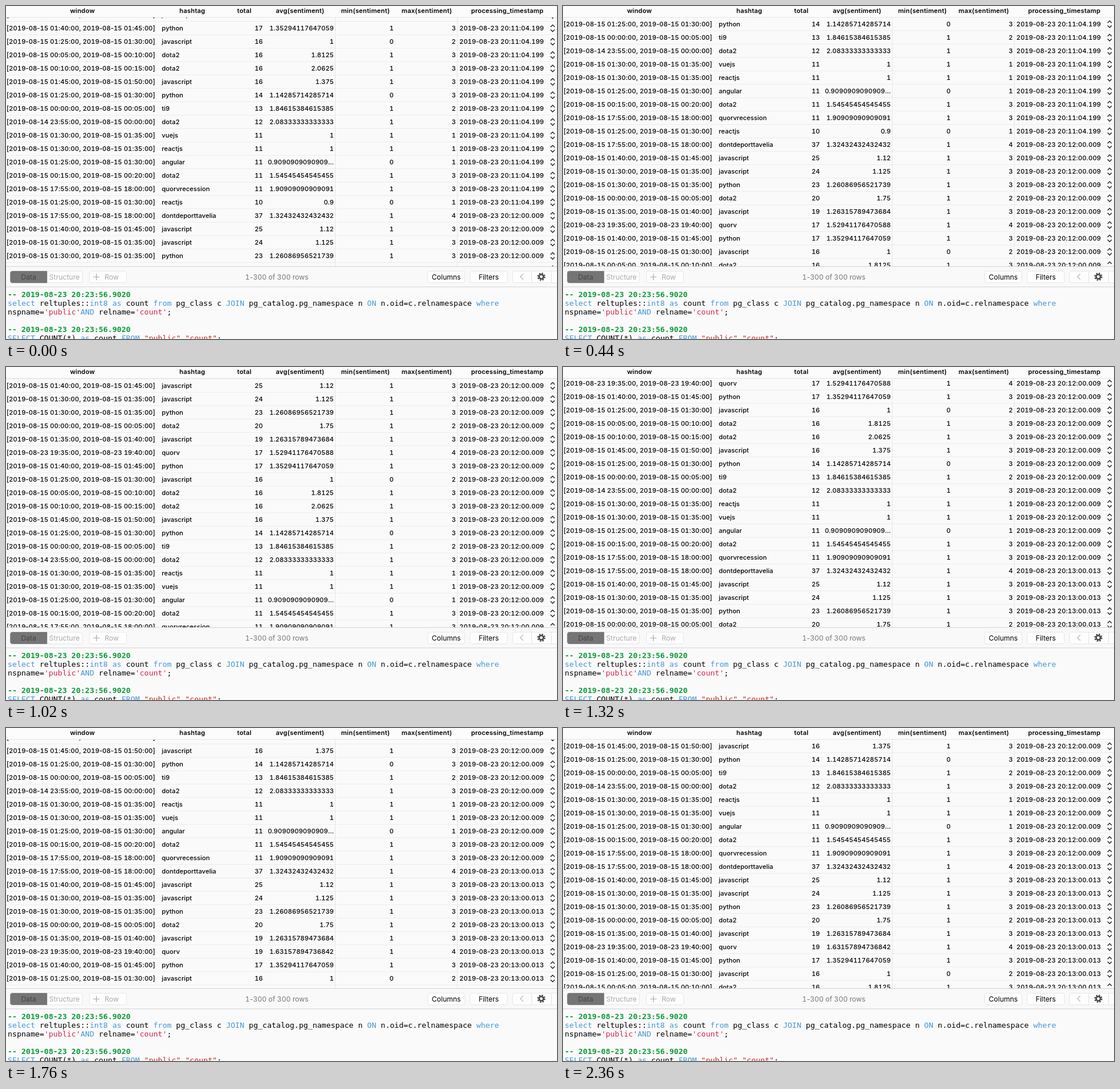
These frames come from a looping animation (948 px wide and 572 px high, 2.66 s). An HTML page:

```html
<!DOCTYPE html>
<html lang="en">
<head>
<meta charset="utf-8">
<title>Query results</title>
<style>
  html, body { margin: 0; width: 100%; height: 100%; overflow: hidden; }
  body { position: relative; background: #fafafa; color: #000; font: 11px Inter, sans-serif;
         font-variant-numeric: tabular-nums; }
  body * { box-sizing: border-box; }
  #header, #table, #bar, #sql, #header span, #bar span, .row, .row span, svg { position: absolute; white-space: pre; }
  s { text-decoration: none; font-variant-numeric: normal; }

  #header { left: 0; top: 0; width: 948px; height: 20px; background: #fcfcfc;
            border-bottom: 1px solid #e6e6e6; font-weight: 600; letter-spacing: .2px; }
  #header span { top: 0; line-height: 16px; transform: translateX(-50%); }

  #table { left: 0; top: 20px; width: 948px; height: 427px; overflow: hidden;
           font-weight: 500; letter-spacing: .05px; }
  #rows { position: absolute; top: -131px; left: 0; }
  .row { left: 0; width: 948px; height: 23px; line-height: 23px; border-bottom: 1px solid #ededed; }
  .row svg { left: 936px; top: 4px; }
  .rule { position: absolute; top: 0; width: 1px; height: 427px; background: #e6e6e6; }

  #bar { left: 0; top: 447px; width: 948px; height: 36px; background: #f9f9f9;
         border: solid #d4d4d4; border-width: 1px 0; font-size: 12px; }
  #bar span { top: 7px; height: 21px; line-height: 20px; text-align: center; }
  #bar .button { background: #fdfdfd; border: 1px solid #e7e7e7; border-radius: 4px; }
  #bar .off { color: #aaa; }
  #bar .on { background: #757575; border: 1px solid #8a8a8a; border-radius: 4px 0 0 4px; color: #454545; }
  #bar svg { left: 0; top: 0; }

  #sql { left: 3px; top: 488px; margin: 0; font: 13px/15px "DejaVu Sans Mono", monospace; }
  #sql i { font-style: normal; font-weight: bold; color: #0b9a37; }
  #sql b { font-weight: normal; color: #4596d6; }
  #sql q { quotes: none; color: #d3244f; }
  #sql u { text-decoration: none; color: #c42b2b; }
  #cursor { left: 0; top: 0; }
</style>
</head>
<body>
<div id="table">
  <div id="rows"></div>
  <div class="rule" style="left:566px"></div>
  <div class="rule" style="left:776px"></div>
</div>
<div id="header"></div>
<div id="bar">
  <span class="button off" style="left:7px;width:125px;padding-left:62px">Structure</span>
  <span class="on" style="left:7px;width:64px">Data</span>
  <span class="button off" style="left:143px;width:65px;padding-left:13px">Row</span>
  <span style="left:366px;width:200px;top:8px;color:#777">1<s>-</s>300 of 300 rows</span>
  <span class="button" style="left:725px;width:65px">Columns</span>
  <span class="button" style="left:798px;width:65px">Filters</span>
  <span class="button" style="left:871px;width:90px"></span>
  <svg width="948" height="34" fill="none">
    <path d="M150 17.5h11M155.5 12v11" stroke="#aaa" stroke-width="1.2"/>
    <path d="M890 12l-5 5 5 5" stroke="#bbb" stroke-width="1.3"/>
    <path d="M904.5 8v19M938.5 8v19" stroke="#e2e2e2"/>
    <circle cx="921" cy="17" r="3.7" stroke="#484848" stroke-width="2.6"/>
    <circle cx="921" cy="17" r="5.8" stroke="#484848" stroke-width="2.4" stroke-dasharray="2.4 2.155"/>
  </svg>
</div>
<pre id="sql"><i>-- 2019-08-23 20:23:56.9020</i>
<b>select</b> reltuples::<b>int8</b> <b>as</b> count <b>from</b> pg_class c <b>JOIN</b> pg_catalog.pg_namespace n <b>ON</b> n.oid=c.relnamespace <b>where</b>
nspname=<q>'public'</q><b>AND</b> relname=<q>'count'</q>;

<i>-- 2019-08-23 20:23:56.9020</i>
<b>SELECT</b> COUNT(*) <b>as</b> count <b>FROM</b> <u>"public"</u>.<u>"count"</u>;</pre>
<svg id="cursor" width="948" height="572">
  <path d="M0 0V14.5L3.4 11.4 5.8 17 8.4 15.9 6 10.4H10.5Z" fill="#000" stroke="#fff"/>
</svg>

<script>
const byId = id => document.getElementById(id);
const LOOP = 2660, STEP = 147, ROW_HEIGHT = 23, BATCH_SIZE = 20;
const MINUTE = 60000, MIDNIGHT = Date.UTC(2019, 7, 15);

// Each entry: hashtag @ window start in minutes after midnight, sentiment sum / tweet total
const ranking = (trend, ties) => `dontdeporttavelia@1075 49/37, javascript@100 28/25,
  javascript@90 27/24, python@90 29/23, dota2@0 35/20, javascript@95 24/19, ${trend}
  python@100 23/17, javascript@85 16/16, dota2@5 29/16, dota2@10 33/16, javascript@105 22/16,
  python@85 16/14, ti9@0 24/13, dota2@-5 25/12, ${ties.map(tag => tag + "@90 11/11")},
  angular@85 10/11, dota2@15 17/11, quorvrecession@1075 21/11, reactjs@85 9/10`
  .split(/,\s*/).slice(0, BATCH_SIZE);

const batches = [
  ["20:11:04.199", ranking("", ["vuejs", "reactjs"])],
  ["20:12:00.009", ranking("quorv@12695 26/17,", ["reactjs", "vuejs"])],
  ["20:13:00.013", ranking("quorv@12695 31/19,", ["reactjs", "vuejs"])],
];

const stamp = ms => new Date(ms).toISOString().slice(0, 19).replace("T", " ");
const narrowMarks = text => text.replace(/\D+/g, "<s>$&</s>");
const leftCell = (x, text) => `<span style="left:${x}px">${text}</span>`;
const rightCell = (x, text) => `<span style="right:${948 - x}px">${text}</span>`;
const chevrons = `<svg width="9" height="15" fill="none" stroke="#222" stroke-width="1.4">
  <path d="M1 5L4.5 1.5 8 5M1 9.5L4.5 13 8 9.5"/></svg>`;

function averageText(value) {
  const text = String(+value.toPrecision(15));
  return text.length > 16 ? text.slice(0, 15) + "…" : text;
}

function highest(tag, start, average, total) {
  if (/^(quorv|dontdeporttavelia)$/.test(tag)) return 4;
  if (average <= 1) return total > 11 ? 2 : 1;
  return start === 0 ? 2 : 3;
}

function rowHtml(entry, time, index) {
  const [tag, minutes, sum, total] = entry.trim().split(/[@ /]/);
  const start = +minutes, average = sum / total, from = MIDNIGHT + start * MINUTE;
  return `<div class="row" style="top:${index * ROW_HEIGHT}px">` +
    leftCell(1, narrowMarks(`[${stamp(from)}, ${stamp(from + 5 * MINUTE)}]`)) +
    leftCell(268, tag) +
    rightCell(442, total) +
    rightCell(564, averageText(average)) +
    rightCell(667, start === 85 ? 0 : 1) +
    rightCell(774, highest(tag, start, average, total)) +
    leftCell(780, narrowMarks(`2019-08-23 ${time}`)) + chevrons + "</div>";
}

byId("rows").innerHTML = batches.map(([time, entries], batch) =>
  entries.map((entry, i) => rowHtml(entry, time, batch * BATCH_SIZE + i)).join("")).join("");

byId("header").innerHTML = [
  [131.5, "window"], [320.5, "hashtag"], [410, "total"], [506, "avg(sentiment)"],
  [618.5, "min(sentiment)"], [724, "max(sentiment)"], [862.5, "processing_timestamp"],
].map(([x, text]) => leftCell(x, text)).join("");

// The flick gathers speed, then coasts to rest at the last scrolling step.
function scrollAt(step) {
  const rest = 14, distance = 582;
  return Math.round(step < 9 ? 31 * step ** 1.2465
                             : distance - Math.max(0, rest - step) ** 2.93);
}

function draw(elapsed) {
  const step = Math.floor((elapsed % LOOP + 9) / STEP);
  byId("rows").style.transform = `translateY(${-scrollAt(step)}px)`;
  // The pointer dips in at the right edge for two steps once the scroll has settled.
  const pointerStep = step - 14;
  const pointer = byId("cursor");
  pointer.style.display = pointerStep === 0 || pointerStep === 1 ? "" : "none";
  pointer.firstElementChild.setAttribute("transform", `translate(939.5 ${445.5 + 45 * pointerStep})`);
}

let startTime;
function tick(now) {
  startTime ??= now;
  draw(now - startTime);
  requestAnimationFrame(tick);
}
draw(0);
requestAnimationFrame(tick);
</script>
</body>
</html>
```
